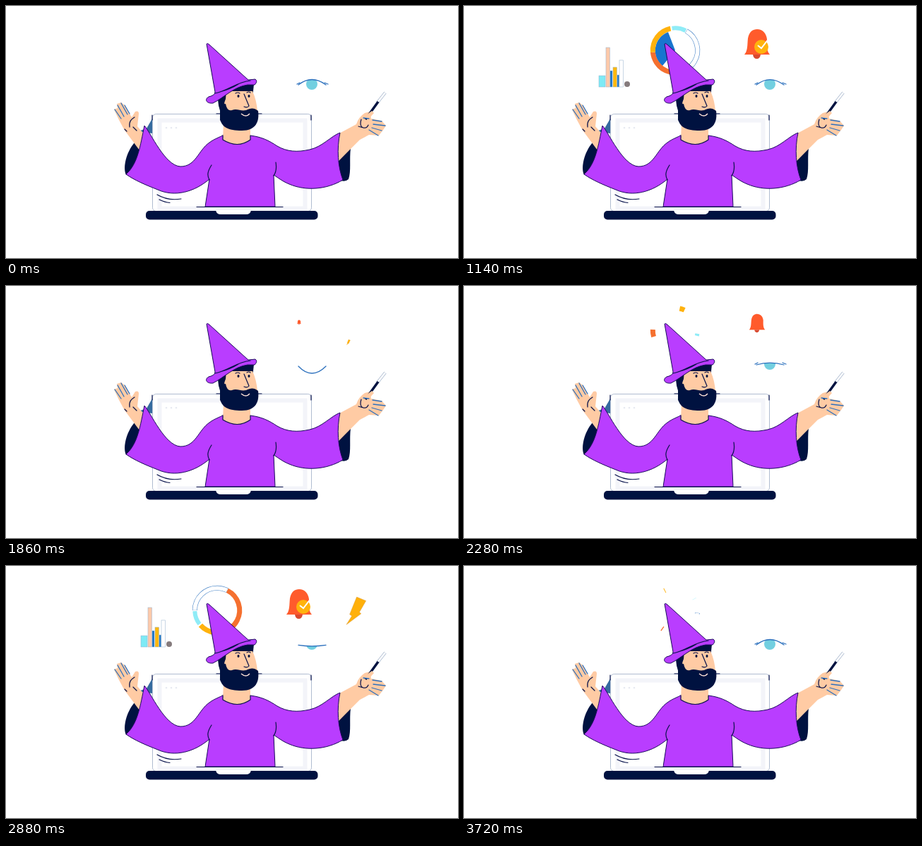
Write an HTML page that moves like this. It is 640 by 358 pixels and loops after 3.78 s.

```html
<!DOCTYPE html>
<html lang="en">
<head>
<meta charset="utf-8">
<title>Wizard</title>
<style>
  html, body { margin: 0; width: 100%; height: 100%; overflow: hidden; background: #fff; }
  svg { display: block; width: 100vw; height: 100vh; }
  .skin { fill: #ffcba4; }
  .navy { fill: #001240; }
  .robe { fill: #b93dff; stroke: #1a0a5c; stroke-width: 1; stroke-linejoin: round; }
  .line { fill: none; stroke: #07114a; stroke-width: 1.2; stroke-linecap: round; }
  .blue { fill: none; stroke: #2c70bd; stroke-width: 1.3; stroke-linecap: round; }
</style>
</head>
<body>
<svg viewBox="0 0 640 358" preserveAspectRatio="none">
  <defs>
    <clipPath id="under"><path id="iris-clip"/></clipPath>
  </defs>

  <g id="ring" transform="translate(299 63)"></g>

  <g id="chart"></g>

  <g id="bell">
    <path fill="#ff5b2c" d="M397 69C402 63 401 55 402 46C404 36 409 33 415 33C423 33 428 39 429 47C429 55 428 63 433 69Z"/>
    <path fill="#d9492f" d="M409 69H420Q419 75 414.500 75Q410 75 409 69Z"/>
    <g id="badge">
      <circle cx="421" cy="58" r="10" fill="#ffb30d"/>
      <path d="M416 56l5 4 10-13" fill="none" stroke="#fff" stroke-width="2"/>
    </g>
  </g>

  <g id="bolt">
    <path fill="#ffb00a" stroke="#d59536" stroke-width=".6" d="M501 32L518 39L506 60L509 63L482 83L492 67L488 64Z"/>
  </g>
  <path id="shard" fill="#f39a20" d="M512 92L515 86L524 84L522 89Z"/>

  <g id="eye">
    <circle cx="433" cy="111" r="8" fill="#72cfe0" clip-path="url(#under)"/>
    <path id="lid" class="blue"/>
    <path id="lash" class="blue" d="M412 111l4-2M456 111l-5-2"/>
  </g>

  <!-- laptop -->
  <path d="M207 160V181L187 178L199 174Z" fill="#356b9f"/>
  <rect x="207.500" y="153.500" width="225" height="138" rx="5" fill="#fff" stroke="#8f9fbd" stroke-width=".7"/>
  <rect x="217.500" y="162.500" width="206" height="125" fill="#fff" stroke="#f3f4f9" stroke-width="6"/>
  <g fill="#e7e9f1"><circle cx="227" cy="173" r="1.300"/><circle cx="234" cy="173" r="1.300"/><circle cx="241" cy="173" r="1.300"/></g>
  <path d="M207 155v7M432 155v7M298 153h6M356 153h6" class="line"/>
  <rect x="198" y="291" width="243.500" height="12.500" rx="5" class="navy"/>
  <path d="M297 290H347Q346 296 340 296H304Q298 296 297 290Z" fill="#fff"/>

  <!-- arms -->
  <path class="navy" d="M182 194C170 208 165 230 170 240C181 238 194 215 194 198Z"/>
  <path class="navy" d="M488 202C486 218 489 235 485 246Q481 250 474 248L469 222Z"/>
  <path class="skin" d="M192 209L172 182C166 174 164 169 160 162L153 147L158 145L157 139L163 137L168 141L175 153L178 158L183 150Q188 148 188 153L186 171L197 184Z"/>
  <path class="blue" d="M154 147L163 160M158 141L167 157M163 138L172 154M168 141L175 153"/>
  <path class="line" d="M175 172C174 164 177 161 182 158M168 175l3 3M180 172l5 5"/>
  <path class="skin" d="M470 182L496 168Q499 158 508 152L516 150L517 160L532 163L538 170L534 176L528 184L514 183L501 190L471 220Z"/>
  <path class="blue" d="M519 162L532 164M520 168L537 170M518 173L532 177M514 176L527 184"/>
  <path class="line" d="M503 161Q500 171 506 173Q511 174 513 169M499 171l7 2"/>
  <path d="M526 137L537 123" stroke="#9fb0c8" stroke-width="4"/>
  <path d="M526 137L537 123" stroke="#fff" stroke-width="2.800"/>
  <path d="M509 161L527 136" stroke="#001240" stroke-width="3.500"/>
  <path class="skin" d="M506 158L518 149L521 152L513 161Z"/>
  <path class="blue" d="M506 159l8 1"/>

  <!-- robe -->
  <path class="robe" d="M196 170C205 180 225 227 247 228C269 228 272 205 288 194C296 188 302 187 308 183L346 184C362 186 372 191 384 199C398 207 412 208 430 204C448 200 460 185 473 180C468 203 470 229 477 247C454 261 424 263 401 253C391 249 384 243 379 240L381 285H282L288 246C267 264 239 272 215 261C197 254 181 247 170 239C187 224 190 198 196 170Z"/>
  <path class="line" d="M288 247C284 240 286 234 291 226M382 222Q384 234 379 241M270 285.500H392M214 268Q229 277 248 274M217 275Q225 279 232 279.500"/>

  <!-- head -->
  <path class="skin" d="M308 165H346V190Q328 203 307 190Z"/>
  <path class="line" d="M307 184V190Q328 203 346 190V184"/>
  <path class="navy" d="M302 118H350V124L318 125V174Q306 170 303 162V148Q298 136 302 118Z"/>
  <path class="skin" d="M312 121H349Q355 134 356 150H314Q306 142 311 132Z"/>
  <path class="navy" d="M302 140L311 139Q313 150 320 148C328 145 332 150 340 148C346 145 351 144 357 149C359 164 354 177 334 177C315 177 303 172 304 158Z"/>
  <path class="navy" d="M318 119L323 111Q341 104 351 111L350 121H330Z"/>
  <path class="line" d="M337 125L344 142Q342 145 337 143M325 124q3-2 6 0M341 123q3-2 5 0"/>
  <ellipse cx="329" cy="128" rx="1.500" ry="2" class="navy"/>
  <ellipse cx="344" cy="128" rx="1.500" ry="2" class="navy"/>
  <path d="M333 153Q340 159 345 153" fill="none" stroke="#ffe3d8" stroke-width="1.400"/>
  <path class="robe" d="M284 54Q285 52 288 55L343 105L353 104Q357 107 352 112L342 112C322 115 309 130 293 138C283 139 281 132 287 129Q296 127 296 122Z"/>
  <path class="line" d="M296 124C313 121 326 108 346 106M303 122Q318 118 329 111"/>
</svg>

<script>
const LOOP = 3780, STEP = 60;
const $ = id => document.getElementById(id);

function add(parent, tag, attrs) {
  const el = document.createElementNS('http://www.w3.org/2000/svg', tag);
  for (const k in attrs) el.setAttribute(k, attrs[k]);
  return parent.appendChild(el);
}

const ease = x => {
  x = Math.min(1, Math.max(0, x));
  return x * x * (3 - 2 * x);
};
// Grows from each window's start, shrinks after its end.
const pulse = (t, spans, d = 240) =>
  Math.max(...spans.map(([a, b]) => ease((t - a) / d) * (1 - ease((t - b) / d))));

function scaleAt(el, s, x, y) {
  el.setAttribute('transform', `translate(${x} ${y}) scale(${s}) translate(${-x} ${-y})`);
}

// x, top, width, colour, delay
const bars = [
  [191, 99, 9, '#7eeaf5', 90], [201, 59, 5.5, '#ffc9aa', 60],
  [207, 92, 3, '#1672c8', 60], [211, 87, 5.5, '#ffb90d', 0],
  [217, 98, 2.5, '#1672c8', 60], [220, 77, 5.5, '#fff', 40]
].map(([x, y, w, fill, delay]) => ({
  y, delay,
  el: add($('chart'), 'rect', { x, width: w, fill, stroke: '#91aecb', 'stroke-width': .5 })
}));
const dot = add($('chart'), 'circle', { cx: 231, cy: 111, r: 4, fill: '#857b7d' });

const pie = add($('ring'), 'path', { d: 'M0 0L-18 22A28 28 0 0 1 -10 -26Z', fill: '#1875cf' });
// start, sweep, colour, width; degrees clockwise from the top
const arcs = [
  [270, 117, '#4a86c8', 7], [270.5, 116, '#fff', 5.8],
  [27, 118, '#f5702f', 7], [145, 83, '#ffb20d', 7], [232, 36, '#8fecf7', 6]
].map(([start, sweep, stroke, w]) => ({
  start, sweep,
  el: add($('ring'), 'circle', { r: 31.7, fill: 'none', stroke, 'stroke-width': w, pathLength: 360 })
}));

function drawRing(t) {
  const k = pulse(t, [[210, 1230], [2220, 3500]]);
  const turn = (t - (t < 1800 ? 600 : 2880)) * 120 / 540;
  $('ring').style.display = k > 0 ? '' : 'none';
  for (const { start, sweep, el } of arcs) {
    el.setAttribute('stroke-dasharray', `${sweep * k} 360`);
    el.setAttribute('transform', `rotate(${start + turn - 90})`);
  }
  pie.setAttribute('transform', `scale(${pulse(t, [[840, 1180]])})`);
}

function drawChart(t) {
  for (const { y, delay, el } of bars) {
    const k = pulse(t, [[570 + delay, 1460 - delay], [2440 + delay, 3360 - delay]]);
    const h = (115 - y) * k;
    el.setAttribute('y', 115 - h);
    el.setAttribute('height', h);
    el.style.display = k > 0 ? '' : 'none';
  }
  dot.setAttribute('r', 4 * pulse(t, [[660, 1480], [2520, 3380]]));
}

function drawEye(t) {
  const open = Math.cos(2 * Math.PI * t / 1260);
  const bend = open > 0 ? -15 * ease(open * 1.15) : 20 * ease(-open * 1.1);
  const base = 112 + 2 * Math.max(0, -open);
  const lid = `M414 ${base}Q433 ${base + bend} 453 ${base}`;
  $('lid').setAttribute('d', lid);
  $('iris-clip').setAttribute('d', lid + 'V130H414Z');
  $('lash').style.display = open > .2 ? '' : 'none';
}

function draw(t) {
  drawRing(t);
  drawChart(t);
  drawEye(t);
  const bell = pulse(t, [[540, 1680], [2140, 3200]]);
  scaleAt($('bell'), bell, 415, 51);
  $('badge').style.display = bell > .75 ? '' : 'none';
  scaleAt($('bolt'), pulse(t, [[340, 660], [1290, 1680], [2715, 3240]]), 482, 84);
  scaleAt($('shard'), pulse(t, [[480, 620]], 120), 518, 88);
}

function tick(now) {
  draw(Math.floor(now % LOOP / STEP) * STEP);
  requestAnimationFrame(tick);
}
draw(0);
requestAnimationFrame(tick);
</script>
</body>
</html>
```
